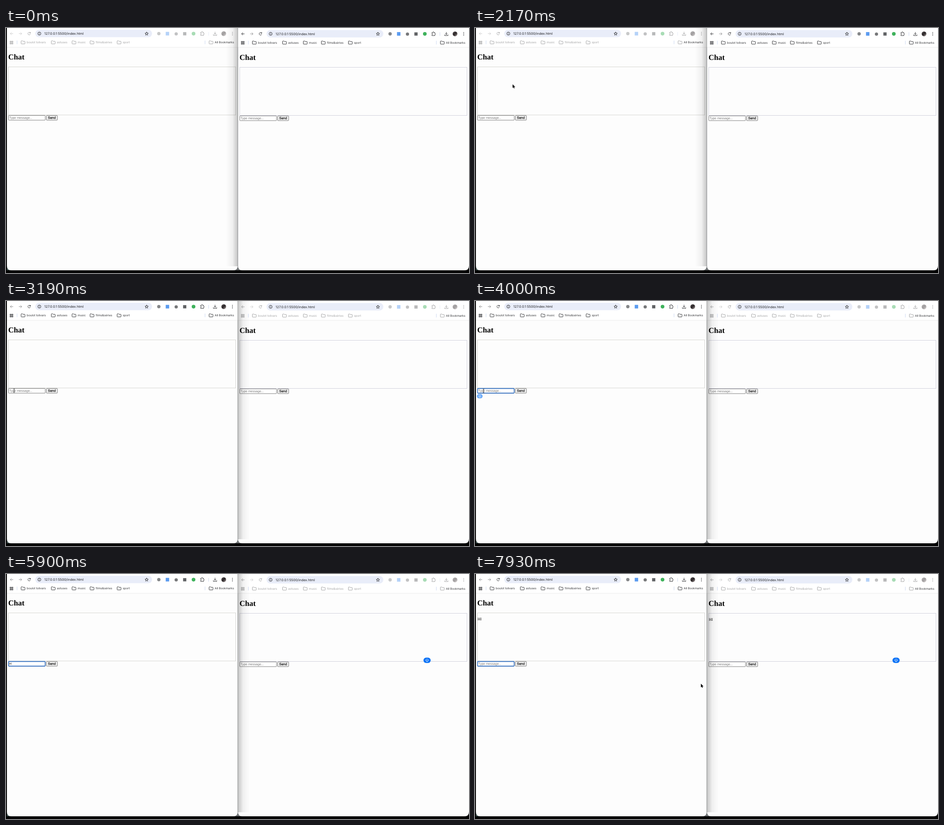
Recreate the animation shown at these times as an HTML page. Size 1027 by 545 pixels, loop 8 s.

```html
<!DOCTYPE html>
<html lang="en">
<head>
<meta charset="utf-8">
<title>Chat</title>
<style>
html, body { margin: 0; width: 100%; height: 100%; overflow: hidden; background: #000; }
svg { display: block; width: 100%; height: 100%; text-rendering: geometricPrecision; }
.ui { font-family: Inter, Roboto, sans-serif; font-size: 6.35px; fill: #303134; }
.url { font-size: 7.4px; fill: #202124; }
.serif { font-family: "Liberation Serif", serif; fill: #000; }
.form { font-family: "Liberation Sans", Arial, sans-serif; font-size: 7.05px; }
.line { fill: none; stroke: #303134; stroke-width: 1; }
.dim { opacity: .45; }

/* hard switches on the shared 8 s clock */
.cut { animation: 8s step-end infinite; }
.left .tone { animation-name: wake; }
.right .tone { animation-name: sleep; }
@keyframes wake { 0% { opacity: .45 } 39.875% { opacity: 1 } }
@keyframes sleep { 0% { opacity: 1 } 39.875% { opacity: .45 } }
.before { animation-name: before; }
.after { animation-name: after; }
@keyframes before { 0% { opacity: 1 } 39.875% { opacity: 0 } }
@keyframes after { 0% { opacity: 0 } 39.875% { opacity: 1 } }

.ring { animation-name: ring; }
@keyframes ring { 0% { opacity: 0 } 47.5% { opacity: 1 } }
.left .hint { animation: hint 8s step-end infinite; }
@keyframes hint { 0% { opacity: 1 } 73.75% { opacity: 0 } 84.75% { opacity: 1 } }
.one { animation-name: one; }
@keyframes one { 0% { opacity: 0 } 73.75% { opacity: 1 } 77.125% { opacity: 0 } }
.two { animation-name: two; }
@keyframes two { 0% { opacity: 0 } 77.125% { opacity: 1 } 84.75% { opacity: 0 } }
.left .msg { animation-name: sent; }
.right .msg { animation-name: got; }
@keyframes sent { 0% { opacity: 0 } 84.75% { opacity: 1 } }
@keyframes got { 0% { opacity: 0 } 85.625% { opacity: 1 } }

.capsA { animation: capsA 8s linear infinite; }
@keyframes capsA {
  0%, 48.5% { opacity: 0; transform: translate(9px, 210px) scale(.5); }
  50% { opacity: .6; transform: translate(10.5px, 211.7px) scale(.8); }
  52.5%, 62.74% { opacity: 1; transform: translate(11px, 212.5px) scale(1); }
  62.75%, 100% { opacity: 0; transform: translate(11px, 212.5px) scale(1); }
}
.capsB { animation-name: capsB; }
@keyframes capsB { 0% { opacity: 0 } 62.75% { opacity: 1 } }

.arrow { animation: move 8s linear infinite; }
@keyframes move {
  0%, 20.375% { transform: translate(185px, -14px); animation-timing-function: ease-out; }
  27.125% { transform: translate(83.5px, 125px); }
  29.625%, 30.5% { transform: translate(54px, 160px); }
  34.75%, 91.5% { transform: translate(19px, 200px); animation-timing-function: ease-out; }
  99.125%, 100% { transform: translate(501px, 244px); }
}
.arrowCut { animation-name: arrowCut; }
@keyframes arrowCut { 0% { opacity: 1 } 34% { opacity: 0 } 91.6% { opacity: 1 } }
.beam { animation-name: beam; }
@keyframes beam {
  0% { opacity: 0; transform: translate(18px, 199.5px); }
  34% { opacity: 1; transform: translate(18px, 199.5px); }
  47.5% { opacity: 1; transform: translate(19px, 200px); }
  73.75% { opacity: 0; transform: translate(19px, 200px); }
}
</style>
</head>
<body>
<svg id="stage" viewBox="0 0 1027 545" preserveAspectRatio="none"></svg>
<script>
const text = (x, y, s, cls = "") => `<text x="${x}" y="${y}" class="${cls}">${s}</text>`;
const path = (d, extra = "") => `<path class="line" d="${d}" ${extra}/>`;
const folder = x => path(`M${x + .5} 34.7v-5.4q0-.8.8-.8h2.4l1 1.1h3.6q.8 0 .8.8v4.3q0 .7-.8.7h-7q-.8 0-.8-.7z`);
const rule = (x, y, h, c) => `<rect x="${x}" y="${y}" width="1" height="${h}" fill="${c}"/>`;

const star = () => {
  let d = "";
  for (let i = 0; i < 10; i++) {
    const r = i % 2 ? 1.7 : 3.9, a = i * Math.PI / 5 - Math.PI / 2;
    d += (i ? "L" : "M") + (312 + r * Math.cos(a)).toFixed(2) + " " + (12.7 + r * Math.sin(a)).toFixed(2);
  }
  return path(d + "z", 'stroke-linejoin="round"');
};

const grid = () => [9, 13].map(x => [29.3, 33.3].map(y =>
  `<rect class="line" x="${x}" y="${y}" width="2.3" height="2.3"/>`).join("")).join("");

const bookmarks = [[33, "boulot tolivars"], [100, "astuses"], [146, "music"],
  [186, "films&amp;séries"], [246, "sport"]];

const toolbar = side => `
  <rect x="65" y="4" width="259" height="16.6" rx="8.3" fill="#e9edf9"/>
  <circle class="line" cx="74" cy="12.4" r="3.4"/>
  <path class="line" d="M74 11.9v2.3M74 10.2v.9"/>
  ${text(85, 15.1, "127.0.0.1:5500/index.html", "url")}${star()}
  <g class="tone cut">
    ${path("M16 12.5H9.7M12.6 9.4l-3.1 3.1l3.1 3.1", side === "left" ? 'opacity=".5"' : "")}
    ${path("M28.5 12.5h6.3M31.9 9.4l3.1 3.1l-3.1 3.1", 'opacity=".5"')}
    ${path("M54 10.9a2.9 2.9 0 1 0 .2 2.6M54.3 9v2.3h-2.4")}
    <circle cx="339" cy="12.5" r="3.7" fill="#858789"/>
    <rect x="354.3" y="8.6" width="7.6" height="8" fill="#5b9bf0"/>
    <circle cx="377.5" cy="13" r="3.6" fill="#77787a"/>
    <rect x="392.8" y="9.2" width="7.2" height="7.2" fill="#626466"/>
    <circle cx="416" cy="12.6" r="4.1" fill="#3fb25c"/>
    ${path("M431.8 9.7h2q-.3-1.6 1.2-1.6t1.2 1.6h2.1v2.1q1.3 0 1.3 1.2t-1.3 1.2v2.2h-6.5v-2.2q1.4 0 1.4-1.2t-1.4-1.2z")}
    ${rule(449, 9, 8, "#cdd9f0")}
    ${path("M463.7 8.5v5.4M461.3 11.7l2.4 2.4l2.4-2.4M459.9 14.3v2h7.6v-2", 'stroke-width="1.1"')}
    <circle cx="483" cy="12.6" r="5.3" fill="url(#photo)"/>
    <g fill="#303134">${[9.6, 12.6, 15.6].map(y => `<circle cx="502.3" cy="${y}" r=".85"/>`).join("")}</g>
    ${grid()}
    ${bookmarks.map(([x, s]) => folder(x) + text(x + 13, 34.2, s)).join("")}
    ${folder(450)}
  </g>
  ${rule(24, 28, 8, "#cdd9f0")}${rule(441, 28, 8, "#cdd9f0")}
  ${text(463, 34.2, "All Bookmarks")}`;

const page = side => `
  ${text(5, 70, "Chat", "serif\" font-size=\"17\" font-weight=\"700")}
  <rect x="5.5" y="86.5" width="504" height="107" fill="none" stroke="${side === "left" ? "#d6d6d2" : "#d0d0dc"}"/>
  <g class="msg cut">${text(5.7, 102.7, "HI", "serif\" font-size=\"8.5")}</g>
  <rect x="5.5" y="194.5" width="81.5" height="10.5" rx=".8" fill="#fff" stroke="#7a7a7a"/>
  <g class="form">
    <g class="hint" fill="#757575">${text(7, 202.2, "Type message...")}</g>
    ${side === "left" ? `<g class="one cut">${text(7, 202.2, "H")}</g><g class="two cut">${text(7, 202.2, "HI")}</g>
    <rect class="ring cut" x="5.6" y="194.6" width="81.2" height="10.3" rx="1.2" fill="none" stroke="#2f6fc4" stroke-width="1.6"/>` : ""}
    <rect x="89.5" y="194.5" width="24.5" height="10.5" rx="1" fill="#efefef" stroke="#7a7a7a"/>
    <g font-size="7.4" stroke="#000" stroke-width=".15">${text(93, 202.3, "Send")}</g>
  </g>`;

const view = (side, dx, dy) => `
  <g class="${side}">
    <g class="ui" transform="translate(${dx} ${dy / 2})">${toolbar(side)}</g>
    <g transform="translate(${dx} ${dy})">${page(side)}</g>
  </g>`;

const frame = (x, w) => `
  <path d="M${x} 0h${w}v529q0 10-10 10h${20 - w}q-10 0-10-10z" fill="#fdfdfd"/>
  <rect x="${x}" width="${w}" height="42.5" fill="#fff"/>
  <rect x="${x}" y="42.5" width="${w}" height="1" fill="#ececec"/>`;

const caps = `
  <rect x="-8" y="-6" width="16" height="12" rx="6" fill="#0b73f6"/>
  <path d="M0-3.5L3.4 0H1.5V3H-1.5V0H-3.4z" fill="none" stroke="#fff" stroke-width=".8" stroke-linejoin="round"/>`;

document.getElementById("stage").innerHTML = `
  <defs>
    <linearGradient id="shadeL"><stop offset="0" stop-opacity="0"/><stop offset=".55" stop-opacity=".05"/><stop offset="1" stop-opacity=".22"/></linearGradient>
    <linearGradient id="shadeR"><stop offset="0" stop-opacity=".22"/><stop offset=".45" stop-opacity=".05"/><stop offset="1" stop-opacity="0"/></linearGradient>
    <linearGradient id="photo" x2="1" y2="1"><stop offset="0" stop-color="#5a5254"/><stop offset=".5" stop-color="#2c2729"/><stop offset="1" stop-color="#b5a9a8"/></linearGradient>
  </defs>
  <rect width="1027" height="545"/>
  <rect x="500" width="28" height="539" fill="#6d7072"/>
  <rect x="2" y="529" width="10" height="10" fill="#3c4f4d"/>
  ${frame(2, 512)}${frame(514.5, 512.5)}
  ${view("left", 0, 0)}${view("right", 513, 1)}
  <rect class="before cut" x="488" width="26" height="530" fill="url(#shadeL)"/>
  <rect class="after cut" x="514.5" width="26" height="530" fill="url(#shadeR)"/>
  <rect x="513.5" width="1" height="530" fill="#8d8f91" opacity=".7"/>
  <g class="capsA">${caps}</g>
  <g class="capsB cut"><g transform="translate(934 192)">${caps}</g></g>
  <g class="beam cut">
    <path d="M-1.5-4.2Q0-4.2 0-3V3Q0 4.2-1.5 4.2M1.5-4.2Q0-4.2 0-3M0 3Q0 4.2 1.5 4.2" fill="none" stroke="#222" stroke-width=".9"/>
  </g>
  <g class="arrowCut cut"><g class="arrow">
    <path d="M0 0V8.2L1.9 6.5L3.1 9.3L4.5 8.7L3.3 6H5.8z" fill="#000" stroke="#fff" stroke-width=".7" paint-order="stroke"/>
  </g></g>`;
</script>
</body>
</html>
```
